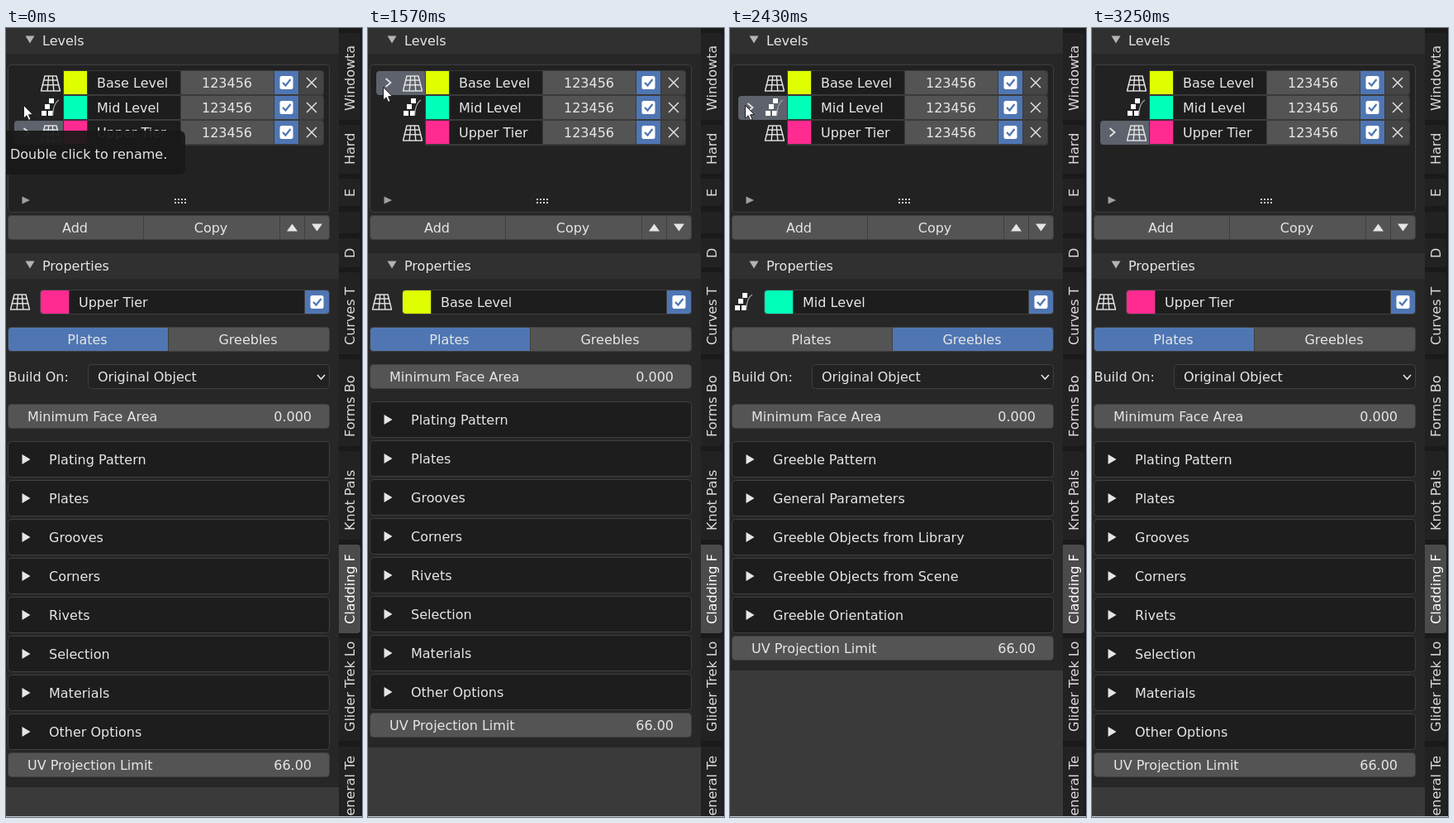
Write an HTML page with a canvas that moves like this. It is 431 by 953 pixels and loops after 3960 ms.

```html
<!DOCTYPE html>
<html lang="en">
<head>
<meta charset="utf-8">
<style>
html, body { margin: 0; width: 100%; height: 100%; overflow: hidden; background: #272727; }
canvas { display: block; }
</style>
</head>
<body>
<canvas id="stage" width="431" height="953"></canvas>
<script>
const c = document.getElementById('stage').getContext('2d');
const LOOP = 3960;
const GREY = '#545454', BLUE = '#4f76b3', DARK = '#1d1d1d', EDGE = '#3f3f3f', TEXT = '#e6e6e6';
const LEFT = [4, 0, 0, 4], RIGHT = [0, 4, 4, 0];

const plates = ['Plating Pattern', 'Plates', 'Grooves', 'Corners', 'Rivets', 'Selection', 'Materials', 'Other Options'];
const greebles = ['Greeble Pattern', 'General Parameters', 'Greeble Objects from Library',
  'Greeble Objects from Scene', 'Greeble Orientation'];
const levels = [
  { name: 'Base Level', color: '#dfff00', icon: grid, panels: plates },
  { name: 'Mid Level', color: '#00ffb9', icon: blocks, panels: greebles },
  { name: 'Upper Tier', color: '#ff2b91', icon: grid, panels: plates }
];
// label, top, bottom
const tabs = [['Windowta', 6, 111], ['Hard', 117, 176], ['E', 182, 215], ['', 222, 248], ['D', 254, 289],
  ['Curves T', 295, 394], ['Forms Bo', 400, 505], ['Knot Pals', 511, 618], ['Cladding F', 624, 731],
  ['Glider Trek Lo', 737, 861], ['General Te', 868, 975]];

// [start time, value]
const selection = [[0, 2], [680, 1], [1570, 0], [2430, 1], [2980, 2]];
const pointer = [[0, [21, 93]], [930, [19, 86]], [1050, [17, 77]], [1200, [18, 71]], [1850, [18, 77]],
  [1970, [18, 84]], [2280, [18, 93]], [2550, [30, 128]], [2700, [32, 134]], [3130, [206, 290]], [3250, null]];
const at = (track, t) => track.filter(k => k[0] <= t).pop()[1];

function box(x, y, w, h, fill, r = 0, edge) {
  c.beginPath();
  if (edge) c.roundRect(x + .5, y + .5, w - 1, h - 1, r);
  else c.roundRect(x, y, w, h, r);
  c.fillStyle = fill;
  c.fill();
  if (edge) {
    c.lineWidth = 1;
    c.strokeStyle = edge;
    c.stroke();
  }
}

function text(s, x, mid, align = 'left', color = TEXT) {
  c.fillStyle = color;
  c.textAlign = align;
  c.fillText(s, x, mid + 6);
}

function path(points, close) {
  c.beginPath();
  points.forEach(p => c.lineTo(...p));
  if (close) c.closePath();
}

function line(points, width = 1.5, color = TEXT) {
  path(points);
  c.lineWidth = width;
  c.strokeStyle = color;
  c.stroke();
}

function shape(points, fill) {
  path(points, true);
  c.fillStyle = fill;
  c.fill();
}

const right = (x, y, w, h, color) => shape([[x, y - h], [x + w, y], [x, y + h]], color);
const down = (x, y, w, h, color) => shape([[x - w, y - h], [x + w, y - h], [x, y + h]], color);

// Perspective floor centred on x, y
function grid(x, y) {
  for (const i of [-1, -1 / 3, 1 / 3, 1]) {
    line([[x + 7 * i, y - 9], [x + 11.5 * i, y + 9]], 1.4);
  }
  for (const v of [0, .28, .6, 1]) {
    const w = 7.5 + 4.5 * v;
    line([[x - w, y - 9 + 18 * v], [x + w, y - 9 + 18 * v]], 1.4);
  }
}

function blocks(x, y) {
  c.fillStyle = '#fff';
  for (const [dx, dy] of [[-2, -11], [-7, -4], [-11, 4], [-3, 4]]) c.fillRect(x + dx, y + dy, 6, 6);
  c.beginPath();
  c.moveTo(x + 10, y - 9);
  c.quadraticCurveTo(x + 3, y - 5, x + 2.5, y + 10);
  c.lineWidth = 1.3;
  c.strokeStyle = '#a5a5a5';
  c.stroke();
}

function check(x, y, r) {
  box(x, y, 29, 28, BLUE, r);
  box(x + 6.5, y + 6, 16, 16, '#fff', 2.5);
  line([[x + 10, y + 14], [x + 13.5, y + 17.5], [x + 19.5, y + 10]], 2.2, BLUE);
}

function header(name, y) {
  box(0, y - 15, 403, 31, '#303030');
  down(29, y - 1, 5.5, 4.5, '#b4b4b4');
  text(name, 44, y);
}

function slider(name, value, mid) {
  box(2, mid - 15, 390, 30, GREY, 4, EDGE);
  text(name, 26, mid);
  text(value, 370, mid, 'right');
}

function levelRow(level, i, selected) {
  const y = 52 + 30 * i, mid = y + 14;
  if (selected) {
    box(10, y, 59, 29, '#5e626c', LEFT);
    line([[21.5, mid - 5], [27.5, mid], [21.5, mid + 5]], 1.7);
  }
  box(69, y - 1, 316, 31, '#3a3a3a', RIGHT);
  box(70, y, 28, 28, level.color);
  box(99, y, 112, 28, DARK);
  box(212, y, 112, 28, GREY);
  check(325, y);
  box(355, y, 29, 28, '#454545', RIGHT);
  line([[364, mid - 6], [376, mid + 6]], 1.4);
  line([[376, mid - 6], [364, mid + 6]], 1.4);
  level.icon(54, mid + (level.icon === grid ? 1 : 0));
  text(level.name, 110, mid);
  text('123456', 267.5, mid, 'center');
}

function levelList(sel) {
  header('Levels', 15);
  box(2, 44, 390, 179, '#222', 4, EDGE);
  levels.forEach((level, i) => levelRow(level, i, i === sel));
  right(19.5, 208, 9.5, 4.5, '#a0a0a0');
  c.fillStyle = '#d0d0d0';
  for (let i = 0; i < 8; i++) c.fillRect(204 + i % 4 * 4, 206 + (i >> 2) * 4, 2, 2);

  box(2, 226, 390, 30, EDGE, 4);
  box(3, 227, 163, 28, GREY, LEFT);
  box(167, 227, 164, 28, GREY);
  box(332, 227, 29, 28, GREY);
  box(362, 227, 29, 28, GREY, RIGHT);
  text('Add', 83.5, 241, 'center');
  text('Copy', 248, 241, 'center');
  down(346.5, 241, 6.5, -4.5, TEXT);
  down(376.5, 241, 6.5, 4.5, TEXT);
}

function properties(sel) {
  const level = levels[sel], rough = level.panels === greebles;
  header('Properties', 287);
  level.icon(17, 331);
  box(41, 316, 351, 30, EDGE, 4);
  box(42, 317, 34, 28, level.color, LEFT);
  box(77, 317, 284, 28, DARK);
  check(362, 317, RIGHT);
  text(level.name, 88, 331);

  box(2, 361, 390, 30, EDGE, 4);
  box(3, 362, 193, 28, rough ? GREY : BLUE, LEFT);
  box(197, 362, 194, 28, rough ? BLUE : GREY, RIGHT);
  text('Plates', 98.5, 376, 'center');
  text('Greebles', 293, 376, 'center');

  let y = 421;
  if (sel > 0) {
    text('Build On:', 2.5, y);
    box(99, y - 15, 293, 30, '#222', 4, EDGE);
    text('Original Object', 111, y);
    line([[377, y - 2], [381.5, y + 3], [386, y - 2]], 1.6);
    y += 48;
  }
  slider('Minimum Face Area', '0.000', y);
  y += 52;
  for (const name of level.panels) {
    box(2, y - 22, 390, 44, DARK, 4, EDGE);
    right(19.5, y, 10, 6, TEXT);
    text(name, 52, y);
    y += 47;
  }
  y -= 7;
  slider('UV Projection Limit', '66.00', y);
  box(0, y + 27, 403, 953, '#3a3a3a');
}

function sidebar() {
  box(403, 0, 28, 953, '#1a1a1a');
  for (const [name, top, bottom] of tabs) {
    const active = top === 624;
    box(403, top, 26, bottom - top, active ? '#4b4b4b' : '#222', RIGHT);
    c.save();
    c.translate(416, bottom - 11);
    c.rotate(-Math.PI / 2);
    text(name, 0, 0, 'left', active ? '#fff' : '#dadada');
    c.restore();
  }
}

function tooltip() {
  box(-6, 124, 223, 53, 'rgba(25,25,25,.94)', 7);
  text('Double click to rename.', 5, 152);
}

function arrow([x, y]) {
  const pts = [[.5, .5], [.5, 16], [4, 12.8], [6.6, 18.4], [9, 17.3], [6.5, 11.8], [11.3, 11.5]];
  path(pts.map(([a, b]) => [x + a, y + b]), true);
  c.fillStyle = '#fff';
  c.fill();
  c.lineWidth = 1;
  c.strokeStyle = '#222';
  c.stroke();
}

function draw(now) {
  const t = now % LOOP, sel = at(selection, t), tip = at(pointer, t);
  c.font = '16px "DejaVu Sans", sans-serif';
  box(0, 0, 431, 953, '#272727');
  levelList(sel);
  properties(sel);
  sidebar();
  box(0, 952, 431, 1, '#c8c8c8');
  if (t < 680) tooltip();
  if (tip) arrow(tip);
  requestAnimationFrame(draw);
}
requestAnimationFrame(draw);
</script>
</body>
</html>
```
